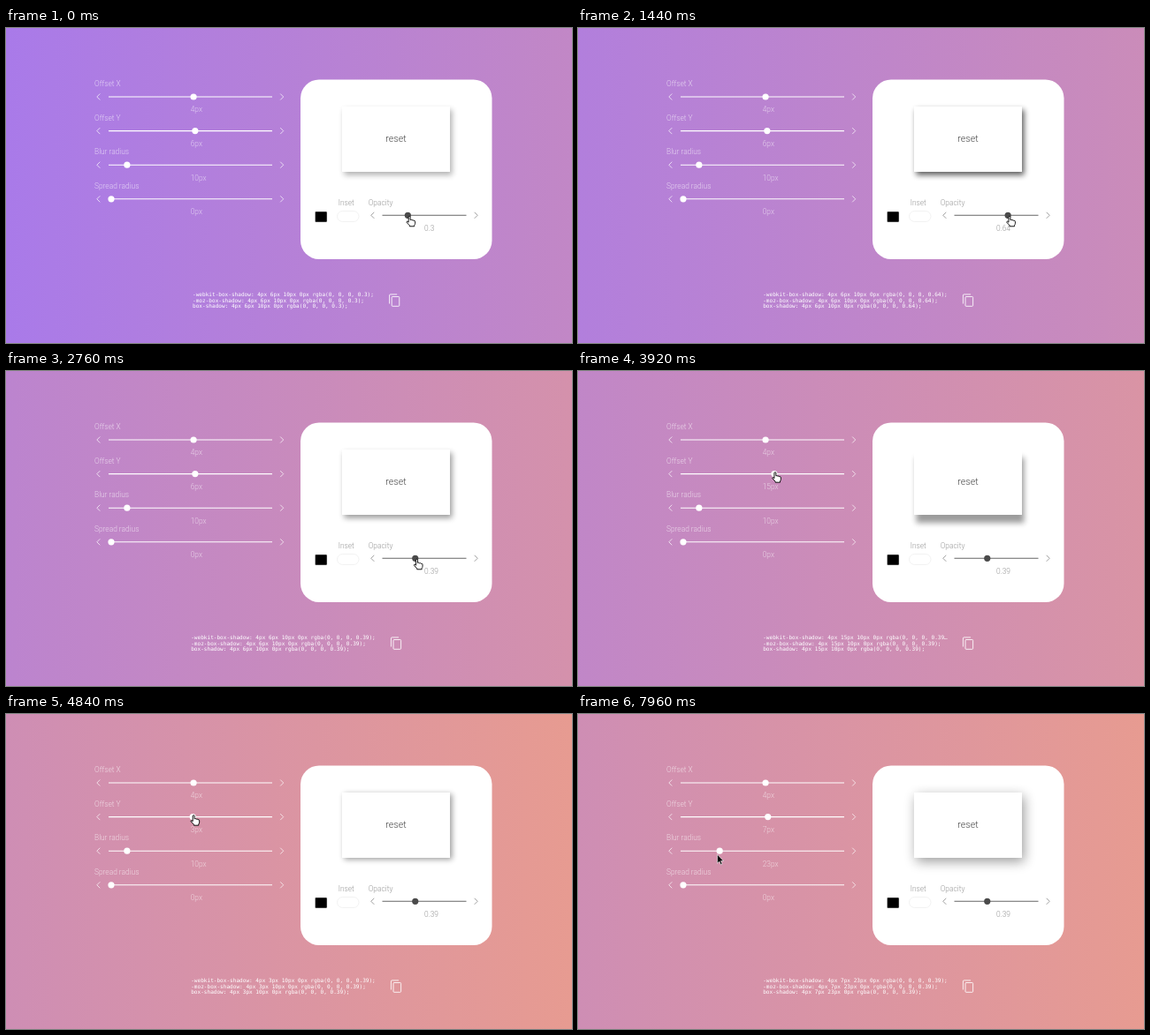
An HTML page that plays this animation: 640x357 px, repeating every 8 s.

```html
<!DOCTYPE html>
<html lang="en">
<head>
<meta charset="utf-8">
<title>Box shadow generator</title>
<style>
html, body { margin: 0; width: 100%; height: 100%; overflow: hidden; }
body {
  background: linear-gradient(90deg, #a97ae9, #e79b91) 0 0 / 250% 100%;
  animation: drift 8s linear infinite;
}
svg { display: block; width: 100%; height: 100%; }
text { font: 300 8.4px Roboto, sans-serif; white-space: pre; }
#panel { fill: #fff; stroke: #fff; }
#panel text { stroke: none; fill-opacity: .65; }
#panel .value { fill-opacity: .6; }
#card text { fill: #999; }
#card .reset { font-size: 10.7px; fill: #444; }
#code text { font: 6.08px "DejaVu Sans Mono", monospace; fill: #fff; }
.chev { fill: none; stroke-width: .7; }
@keyframes drift {
  0%, 3% { background-position: 0 0; }
  27% { background-position: 38% 0; }
  34.5%, 45% { background-position: 50% 0; }
  60%, 100% { background-position: 100% 0; }
}
</style>
</head>
<body>
<svg viewBox="0 0 640 357" preserveAspectRatio="none">
  <g id="panel"></g>
  <g id="card">
    <rect x="333" y="58.5" width="216.5" height="203.5" rx="21" fill="#fff"/>
    <rect id="shadow" x="380" y="89" width="122" height="74"/>
    <rect x="380" y="89" width="122" height="74" fill="#fff"/>
    <text class="reset" x="441" y="129.4" text-anchor="middle">reset</text>
    <rect x="349.5" y="208" width="13.5" height="12" rx="1" stroke="#ddd" stroke-width=".5"/>
    <text x="375.7" y="200.6">Inset</text>
    <rect x="374.5" y="207.5" width="24.5" height="12" rx="6" fill="#fff" stroke="#ececec" stroke-width=".7"/>
    <text x="409.7" y="200.8">Opacity</text>
    <path class="chev" stroke="#777" d="M416.3 208.8l-3.5 3.5 3.5 3.5M529.7 208.8l3.5 3.5-3.5 3.5"/>
    <path stroke="#666" stroke-width="1.1" d="M425.5 212.3H520.5"/>
    <circle id="opKnob" cy="212.3" r="3.6" fill="#4a4a4a"/>
    <text id="opText" x="473" y="229.7"></text>
  </g>
  <g id="code">
    <text y="304"></text>
    <text y="310.7"></text>
    <text y="317.4"></text>
    <g id="copy" fill="none" stroke="#fff" stroke-opacity=".85">
      <path d="M.6 11.2V1.7q0-1.1 1.1-1.1H9.2"/>
      <rect x="3.2" y="3.2" width="8.6" height="10.8" rx=".9"/>
    </g>
  </g>
  <g id="cursor" stroke="#000" fill="#fff" stroke-linejoin="round">
    <path id="hand" stroke-width=".9" transform="scale(1.08 1)" d="M2.6 7.4V1.5q0-1 .9-1t.9 1V4.6q1.4-.6 1.8.4 1.3-.5 1.7.5 1.5-.4 1.6 1V8.6q0 1.2-.8 2.1V12H3.7V11L.7 7.6Q.3 6.6 1.3 6.4Z"/>
    <path id="arrow" fill="#000" stroke="#fff" stroke-width=".6" d="M0 0V10L2.3 8 3.9 11.6 5.5 10.9 4 7.4H7Z"/>
  </g>
</svg>
<script>
const $ = id => document.getElementById(id);
const LOOP = 8000, SCALE = .61, CHAR = 3.66, MAX_CHARS = 57;

const rowY = i => 78 + 38.6 * i;
const offsetKnob = v => 208.5 + .895 * v;
const radiusKnob = v => 119 + 1.79 * v;
const opacityKnob = v => 426.3 + 93.5 * v;

// Turning points of each drag: [ms, value]
const opacity = [[240, .3], [1240, .68], [2160, .35], [2500, .39]];
const offsetY = [[3480, 6], [4200, 20], [4840, 3], [5200, 7]];
const blur = [[6680, 10], [7640, 23]];

// Where the pointer rests, and when
const stops = [
  { from: 0, to: 2760, y: 212.8, x: s => opacityKnob(s.op) - 2 },
  { from: 3300, to: 5520, y: rowY(1) - 2.4, x: s => offsetKnob(s.y) - 2.8 },
  { from: 6200, to: 7700, y: rowY(2) + 2, x: s => radiusKnob(s.blur) - 2.6 },
  { from: 7940, to: LOOP, y: rowY(2) + 4, x: s => radiusKnob(s.blur) - 2.6 },
];

const mix = (a, b, p) => a + (b - a) * p;
const ease = p => (1 - Math.cos(Math.PI * p)) / 2;

function at(track, t) {
  const i = track.findIndex(k => k[0] > t);
  if (i === 0) return track[0][1];
  if (i < 0) return track[track.length - 1][1];
  const [t0, a] = track[i - 1], [t1, b] = track[i];
  return mix(a, b, ease((t - t0) / (t1 - t0)));
}

const rows = ["Offset X", "Offset Y", "Blur radius", "Spread radius"];
$("panel").innerHTML = rows.map((label, i) => {
  const y = rowY(i);
  return `<text x="100" y="${y - 12}">${label}</text>
    <path class="chev" d="M106.3 ${y - 3.5}l-3.5 3.5 3.5 3.5M310.2 ${y - 3.5}l3.5 3.5-3.5 3.5"/>
    <path stroke-width="1.1" d="M116 ${y}H301"/>
    <circle cy="${y}" r="3.6" stroke="none"/>
    <text class="value" x="208.7" y="${y + 17.4}"></text>`;
}).join("");
const knobs = document.querySelectorAll("#panel circle");
const values = document.querySelectorAll("#panel .value");
const lines = document.querySelectorAll("#code text");

function setRow(i, v, knob) {
  knobs[i].setAttribute("cx", knob(v));
  values[i].textContent = v + "px";
}

function setCode(rule) {
  const css = ["-webkit-", "-moz-", ""].map(p => {
    const s = p + "box-shadow: " + rule;
    return s.length > MAX_CHARS ? s.slice(0, MAX_CHARS - 1) + "…" : s;
  });
  const width = css[0].length * CHAR;
  const left = 328.2 - (width + 29.4) / 2;
  lines.forEach((line, i) => {
    line.setAttribute("x", left);
    line.textContent = css[i];
  });
  $("copy").setAttribute("transform", `translate(${left + width + 17} 301.3)`);
}

function setShadow(s) {
  const el = $("shadow");
  el.setAttribute("transform", `translate(${4 * SCALE} ${s.y * SCALE})`);
  el.style.filter = `blur(${s.blur * SCALE / 2}px)`;
  el.style.opacity = s.op;
}

// A hand on a control, an arrow on the way to the next one
function setCursor(s, t) {
  const i = stops.findLastIndex(stop => stop.from <= t);
  const a = stops[i], b = stops[i + 1] || a;
  const moving = t > a.to;
  const p = moving ? ease((t - a.to) / (b.from - a.to)) : 0;
  const arrow = moving || a === b;
  $("hand").style.display = arrow ? "none" : "";
  $("arrow").style.display = arrow ? "" : "none";
  $("cursor").setAttribute("transform", `translate(${mix(a.x(s), b.x(s), p)} ${mix(a.y, b.y, p)})`);
}

function draw(t) {
  const s = {
    op: Math.round(at(opacity, t) * 100) / 100,
    y: Math.round(at(offsetY, t)),
    blur: Math.round(at(blur, t)),
  };
  setRow(0, 4, offsetKnob);
  setRow(1, s.y, offsetKnob);
  setRow(2, s.blur, radiusKnob);
  setRow(3, 0, radiusKnob);
  $("opKnob").setAttribute("cx", opacityKnob(s.op));
  $("opText").textContent = s.op;
  setCode(`4px ${s.y}px ${s.blur}px 0px rgba(0, 0, 0, ${s.op});`);
  setShadow(s);
  setCursor(s, t);
}

let start;
function tick(now) {
  start ??= now;
  draw((now - start) % LOOP);
  requestAnimationFrame(tick);
}
draw(0);
requestAnimationFrame(tick);
</script>
</body>
</html>
```
